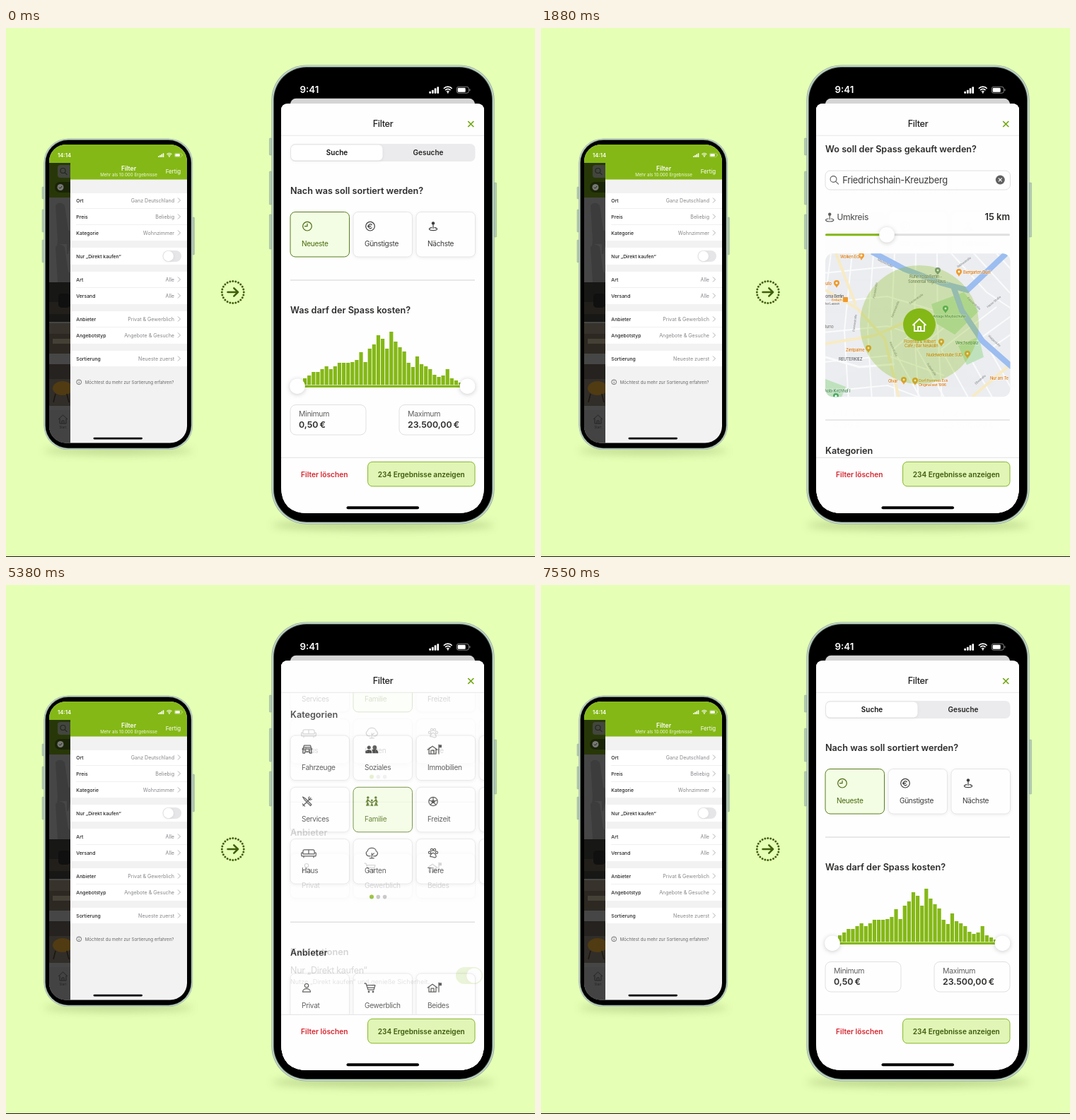
Write an HTML page that moves like this. It is 748 by 749 pixels and loops after 7590 ms.

```html
<!DOCTYPE html>
<html lang="de">
<head>
<meta charset="utf-8">
<title>Filter</title>
<style>
html, body { margin: 0; width: 100%; height: 100%; overflow: hidden; background: #e5ffb5; }
svg { display: block; width: 748px; height: 749px; font-family: Inter, "Open Sans", sans-serif; }
.tight { letter-spacing: -.02em; }
.tight text[font-weight="600"] { letter-spacing: 0; }
.soft { filter: drop-shadow(0 1px 2px rgba(0,0,0,.07)); }
.knob { filter: drop-shadow(0 1px 3px rgba(0,0,0,.2)); }
.ico { fill: none; stroke-width: 1.2; stroke-linecap: round; stroke-linejoin: round; }
</style>
</head>
<body>
<svg id="stage" viewBox="0 0 748 749"></svg>
<script>
const GREEN = '#84b816', INK = '#2c2d2b', GREY = '#5d5e5c';
const rect = (x, y, w, h, fill, r = 0, more = '') =>
  `<rect x="${x}" y="${y}" width="${w}" height="${h}" rx="${r}" fill="${fill}" ${more}/>`;
const disc = (x, y, r, fill, more = '') => `<circle cx="${x}" cy="${y}" r="${r}" fill="${fill}" ${more}/>`;
const line = (d, color, w = 1, more = '') =>
  `<path d="${d}" fill="none" stroke="${color}" stroke-width="${w}" ${more}/>`;
const text = (x, y, size, str, fill = INK, weight = 400, anchor = 'start', more = '') =>
  `<text x="${x}" y="${y}" font-size="${size}" fill="${fill}" font-weight="${weight}" text-anchor="${anchor}" ${more}>${str}</text>`;
const group = (body, attrs) => `<g ${attrs}>${body}</g>`;
const dot = (x, y, r) => `M${x - r} ${y}a${r} ${r} 0 1 0 ${2 * r} 0a${r} ${r} 0 1 0 ${-2 * r} 0`;
const heading = (y, str) => text(402, y, 12.65, str, INK, 600);
const rule = y => line(`M402 ${y}H663`, '#d2d3d2', 1.1);

// Icons are centred on 0,0: [stroked path, filled path]
const house = 'M-8 0L-1-5L6 0M-6-1V6H4V-1M-3 6V1H1V6';
const icons = {
  clock: [dot(0, 0, 6.3) + 'M0-3.5V0H-3.5'],
  euro: [dot(0, 0, 6.3) + 'M2.2-2.2A2.9 2.9 0 1 0 2.2 2.2M-3.6 0H.8'],
  pin: ['M0-2V3M-2 2C-8 3-6 6 0 6S8 3 2 2', dot(0, -4.3, 2.2)],
  car: ['M-6 5V-1L-4.5-6H4.5L6-1V5H3.5V3H-3.5V5ZM-7-1H7M-4.5-3.4H4.5M-4 1H-2M2 1H4'],
  people: ['', dot(-4, -3.3, 2.5) + dot(4, -3.3, 2.9) + 'M-9 5V3C-9-1 0-1 0 3V5ZM1 5V2.5Q.7 1 0 .3C4-2 9 0 9 4V5Z'],
  home: [house + 'M8 6V-7', 'M8-7H12V-3H8Z'],
  tools: ['M-6 6L5-5M3-6.5C0-4 3-1 6.4-3M-6.5-6.5L-3-4.5L6 4.5L4.5 6L-4-2.5ZM-6.7 3.5L-3.5 6.7'],
  family: ['M-6-3V6M-8 1L-6-3L-3 0L0 2L3 0L6-3L8 1M-7.5 6L-6 1L-4 6M0 1V6M-1.5 6L0 3L1.5 6M6-3V6M4 6L6 1L8 6', dot(-5.5, -5.5, 1.8) + dot(0, -1.5, 1.5) + dot(5.5, -5.5, 1.8)],
  ball: [dot(0, 0, 6.2) + 'M0-2.5V-6M2.5-.6L6-2M1.5 2.2L4 5M-1.5 2.2L-4 5M-2.5-.6L-6-2', 'M0-2.8L2.7-.8L1.7 2.5H-1.7L-2.7-.8Z'],
  sofa: ['M-6-1V-3Q-6-5-4-5H8Q10-5 10-3V-1M2-5V1M-6 1Q-6-1-7.5-1T-8 4H12Q13-1 11.5-1T10 1H-6M-5 4V6M9 4V6'],
  tree: ['M0 7V0M0 3L3 0M-3 7H3M-2 4C-9 5-9-2-6-3C-6-9 6-9 6-3C10-1 8 5 2 4'],
  paw: [dot(-5, -1, 1.6) + dot(-2, -4.8, 1.6) + dot(2, -4.8, 1.6) + dot(5, -1, 1.6) + 'M0-.5C3-.5 3 2 4 3.5S3 7 0 5.5S-5 6-4 3.5S-3-.5 0-.5'],
  person: [dot(-1, -3, 2.7) + 'M-6.5 6C-6.5 0 4.5 0 4.5 6Z'],
  cart: ['M-8-6H-6L-3 3H5L7-3.5H-5M-4 0H6', dot(-2, 5.7, 1.4) + dot(4, 5.7, 1.4)]
};
const wide = ['people', 'family', 'tree'];
const icon = (name, x, y, color = INK) => {
  const [stroke, fill = ''] = icons[name];
  return `<g transform="translate(${x} ${y})"><path class="ico" d="${stroke}" stroke="${color}"/><path d="${fill}" fill="${color}"/></g>`;
};
const card = (col, y, name, label, on) => {
  const x = 402 + col * 89, color = on ? '#486a0c' : '#3b3c3a';
  return rect(x, y, 83.5, 63.5, on ? '#f3fde4' : '#fefefe', 7, on ? 'stroke="#587c1d"' : 'stroke="#e4e5e4" class="soft"') +
    (name ? icon(name, x + (wide.includes(name) ? 26.3 : 24), y + 20.2, color) : '') +
    text(x + 16, y + 48.7, 10.1, label, color);
};
const magnifier = (x, y, s, color) =>
  line(dot(x, y, 4.2 * s) + `M${x + 3 * s} ${y + 3 * s}l${4 * s} ${4 * s}`, color, 1.1);

function status(x, y, s) {
  const bars = [3, 5, 7.5, 9.5].map((h, i) => rect(i * 3.7, 10 - h, 2.7, h, '#fff', .7)).join('');
  const wifi = [2.2, 5, 7.8].map(r => line(`M${26.5 - r * .75} ${9.3 - r * .8}A${r} ${r} 0 0 1 ${26.5 + r * .75} ${9.3 - r * .8}`, '#fff', 1.7)).join('');
  return group(bars + wifi + disc(26.5, 8.8, 1.1, '#fff') +
    rect(39, .5, 17, 9, 'none', 2.7, 'stroke="#fff" stroke-opacity=".5"') +
    rect(40.4, 2, 11, 6, '#fff', 1.3) + rect(57, 3.5, 1.2, 3, '#fff', .6, 'opacity=".5"'),
    `transform="translate(${x} ${y}) scale(${s})"`);
}

function phone(x, y, w, h, r, k, left, right) {
  const key = (kx, [ky, kh]) => rect(kx, ky, 3.4 * k, kh, '#b3cbb0', 1, 'stroke="#94ab93" stroke-width=".5"');
  const body = (d, fill, more) => rect(x + d, y + d, w - 2 * d, h - 2 * d, fill, r - d, more);
  return `<ellipse cx="${x + w / 2}" cy="${y + h + 1}" rx="${w * .5}" ry="${7 * k}" fill="#7d9650" opacity=".4" filter="url(#blur)"/>` +
    left.map(b => key(x - 2.6 * k, b)).join('') + right.map(b => key(x + w - .8 * k, b)).join('') +
    body(.4, '#8fa596') + body(1.1 * k, '#c0d4c6') + body(3.1 * k, '#46544b') + body(4 * k, '#000');
}

function oldScreen() {
  const row = (y, label, value) => text(99.3, y + 2.5, 6.85, label, '#222', 500) + (value
    ? text(238, y + 2.5, 7.1, value, '#85868a', 400, 'end') + line(`M243 ${y - 3.5}l3.5 3.5l-3.5 3.5`, '#b0b0b3') : '');
  const section = (y, h) => rect(91, y, 165, h, '#fff');
  const sep = y => line(`M99 ${y}H256`, '#ececec', .8);
  const chair = y => `<path d="M70 ${y}q6-7 13 0l5 35l3 2v18l-3 14h-2v-14h-10l-3 16h-2l2-22z" fill="#3c3c3c"/>`;
  const drawer = rect(61, 191, 30, 397, '#464646') + rect(61, 191, 30, 49, '#283708') +
    rect(73, 194, 24, 18, '#42463d', 4) + magnifier(80.5, 202, .85, '#23261f') +
    rect(69, 218, 30, 15, '#1a2406', 7) + disc(77, 225.5, 4.5, '#777') + line('M75 225.5l1.5 1.6l2.8-3.2', '#1a2406') +
    chair(251) + chair(310) +
    rect(61, 360, 30, 56, '#171716') + rect(61, 388, 30, 17, '#221f1b') + rect(74, 376, 17, 20, '#0f100f', 5) +
    rect(61, 418, 30, 43, '#2d2822') + rect(61, 418, 30, 15, '#37322b') + rect(66, 440, 25, 7, '#454036') +
    rect(61, 476, 30, 59, '#312d29') + rect(61, 476, 30, 21, '#25221f') +
    `<ellipse cx="80" cy="510" rx="14" ry="10" fill="#503b12"/>` + line('M70 518l-3 12M86 518l3 12', '#1c160d', 1.5) +
    rect(61, 541, 30, 47, '#434343') + line('M74 554l6.5-6l6.5 6M76 553v7h9v-7M79 560v-4h3v4', '#252525', 1) +
    text(80.5, 567, 4.5, 'Start', '#252525', 400, 'middle');
  const body = rect(61, 165, 195, 423, '#f2f2f2') + group(drawer, 'clip-path="url(#drawer)"') +
    rect(61, 165, 195, 26, GREEN) + rect(91, 190, 165, 24.5, GREEN) +
    text(73, 182.5, 7.7, '14:14', '#fff', 600) + status(215, 177, .6) +
    text(173.5, 202, 8.6, 'Filter', '#fff', 600, 'middle') +
    text(173.5, 210, 6.2, 'Mehr als 10.000 Ergebnisse', '#f0f8dd', 400, 'middle') +
    text(247, 205.7, 7.9, 'Fertig', '#fff', 400, 'end') +
    section(234, 67) + sep(255.5) + sep(278.5) +
    row(244, 'Ort', 'Ganz Deutschland') + row(267, 'Preis', 'Beliebig') + row(290, 'Kategorie', 'Wohnzimmer') +
    section(311, 24) + row(323, 'Nur „Direkt kaufen“') +
    rect(221.5, 315, 26.5, 16, '#e6e6e8', 8) + disc(229.7, 323, 7.2, '#fff', 'class="soft"') +
    section(345, 46) + sep(367.5) + row(356, 'Art', 'Alle') + row(379, 'Versand', 'Alle') +
    section(401, 46) + sep(423.5) + row(412, 'Anbieter', 'Privat &amp; Gewerblich') + row(435, 'Angebotstyp', 'Angebote &amp; Gesuche') +
    section(457, 22) + row(468, 'Sortierung', 'Neueste zuerst') +
    line(dot(103.2, 501.3, 3.4) + 'M103.2 500.8v2.4M103.2 499v.8', '#555', .8) +
    text(111.8, 503.7, 6.15, 'Möchtest du mehr zur Sortierung erfahren?', '#666') +
    rect(123.5, 579.7, 69.5, 2.8, '#000', 1.4);
  return group(body, 'clip-path="url(#small)"');
}

function sortScreen() {
  const tops = [496, 492, 487, 487, 483, 479, 483, 479, 474, 474, 474, 473, 470, 459, 473, 454, 448, 435, 440,
    454, 430, 444, 452, 458, 474, 480, 465, 476, 479, 483, 491, 494, 492, 483, 496, 499, 502];
  const field = (x, label, value) => rect(x, 533.5, 107, 42.5, '#fefefe', 8, 'stroke="#dfe0df"') +
    text(x + 12, 550, 10.5, label, GREY) + text(x + 12, 566, 12.4, value, INK, 600);
  return rect(402, 164, 261.5, 25, '#ebebed', 7) + rect(403, 165.5, 129.5, 22, '#fff', 6, 'class="soft"') +
    text(468, 180, 10, 'Suche', '#111', 600, 'middle') + text(597, 180, 10, 'Gesuche', '#222', 600, 'middle') +
    heading(235, 'Nach was soll sortiert werden?') +
    card(0, 260.5, 'clock', 'Neueste', true) + card(1, 260.5, 'euro', 'Günstigste') + card(2, 260.5, 'pin', 'Nächste') +
    rule(357) + heading(404, 'Was darf der Spass kosten?') +
    tops.map((y, i) => rect(420 + i * 6.11, y, 5.2, 505.3 - y, GREEN)).join('') + rect(412, 505.8, 241, 3.2, GREEN) +
    [412, 652.5].map(x => disc(x, 507.2, 10.8, '#fff', 'class="knob"')).join('') +
    field(402, 'Minimum', '0,50&#8201;€') + field(556, 'Maximum', '23.500,00&#8201;€');
}

function map() {
  const ORANGE = '#d9780f';
  const label = (x, y, str, color = ORANGE, size = 5.8, more = '') => text(x, y, size, str, color, 500, 'start',
    'stroke="#fff" stroke-width="1" stroke-opacity=".6" paint-order="stroke" ' + more);
  const pin = (x, y, color = '#ee9a2c') => `<path d="M${x} ${y + 6}c-1-3-4-4-4-7a4 4 0 0 1 8 0c0 3-3 4-4 7z" fill="${color}"/>` + disc(x, y - 1, 1.5, '#fff');
  const street = (x, y, angle, str) => text(0, 0, 4.3, str, '#85888c', 400, 'middle', `transform="translate(${x} ${y}) rotate(${angle})"`);
  let roads = '';
  for (let i = 0; i < 6; i++) roads += line(`M${410 + i * 30} 319l${-14 + i * 3} 110l6 100`, '#fafbfb', 2);
  for (let i = 0; i < 5; i++) roads += line(`M400 ${347 + i * 42}l90 -9l80 ${22 + i * 2}`, '#fafbfb', 2);
  for (let i = 0; i < 5; i++) roads += line(`M${540 + i * 34} 530l-42-75l${70 + i * 4}-60`, '#fafbfb', 2);
  for (let i = 0; i < 3; i++) roads += line(`M${580 + i * 32} 319l50 55l60 40`, '#fafbfb', 2);
  return rect(402, 319, 262, 204, '#ebedf0') + roads +
    line('M402 371L447 397L486 440L506 523M402 447L470 436L550 402M417 319L445 392M610 522L664 476', '#f8ebc4', 4) +
    '<path d="M552 391L598 374L619 401L585 434L560 419ZM590 450L619 437L626 466L602 477ZM402 497L431 508L425 523H402Z" fill="#bfe2bd"/>' +
    line('M468 317L513 341L566 361L603 371L660 317M583 366L595 400L624 443L666 480', '#9cbdf0', 8) +
    line('M402 466L450 480L500 476', '#fafbfb', 3) +
    street(445, 418, -83, 'Pannierstraße') + street(474, 372, -80, 'Friedelstraße') + street(497, 455, 66, 'Weserstraße') +
    street(486, 334, 27, 'Maybachufer') + street(611, 391, 43, 'Pannierstraße') + street(641, 389, -39, 'Harzer Straße') +
    street(640, 444, 43, 'Weigandufer') + street(531, 385, -35, 'Sanderstraße') + street(551, 484, 55, 'Fuldastraße') +
    street(502, 399, -68, 'Nansenstraße') + street(622, 499, -40, 'Elbestraße') + street(599, 333, -36, 'Ratiborstraße') +
    pin(453, 323) + label(423, 326, 'Wolken Eck') + pin(591, 346) + label(597, 348, 'Biergarten Quirl') +
    pin(418, 362) + label(402, 364, 'ullo') +
    label(402, 382, 'oma Berlin', '#555', 5.8) + label(411, 387, 'Einfach', ORANGE, 4.7) + label(402, 392, 'ter Lassen', '#777', 4.7) + rect(427, 381, 7, 7, '#ee9a2c', 1) +
    pin(561, 344, '#77918b') + label(521, 354, 'Ruhe Yoga Berlin -', '#666d70') + label(519, 361, 'Sonnental Yoga Haus...', '#666d70') +
    pin(572, 398, '#4ca965') + label(554, 410, 'Anlage Maybachufer', '#398048', 5.3) +
    label(402, 425, 'lumo', '#777', 5.5) + label(586, 448, 'Weichselplatz', '#398048', 5.5) +
    label(513, 446, 'Florentia &amp; Wilbert') + label(514, 452, 'Café / Bar Neukölln') + pin(566, 445) +
    label(431, 458, 'Zimtpalme') + pin(463, 454) + label(545, 465, 'Nudelwerkstube SÜD', ORANGE, 5.5) + pin(603, 462) +
    label(421, 471, 'REUTERKIEZ', '#596066', 6) +
    label(491, 502, 'Olvar') + pin(513, 499) + pin(529, 500) + label(534, 501, 'Dorf Pommes Eck', ORANGE, 5.4) + label(534, 507, 'Original seit 1996', ORANGE, 5.4) +
    label(635, 498, 'Nur am Te') + label(402, 516, 'kobi Kirchhof I', '#398048', 5.8) + pin(417, 522, '#4ca965') +
    disc(535, 420, 84, GREEN, 'opacity=".3"') + disc(535, 420, 23, GREEN) +
    line('M525.5 421L535 412L544.5 421M528 420V429H542V420M533 429V423H537V429', '#fff', 1.9);
}

function placeScreen() {
  return heading(176, 'Wo soll der Spass gekauft werden?') +
    rect(402, 202, 261.5, 27, '#fefefe', 7, 'stroke="#dfe0df"') + magnifier(413.5, 214, 1.05, GREY) +
    text(426.3, 219.7, 12.95, 'Friedrichshain-Kreuzberg', '#3b3c3a') +
    disc(649.3, 215, 6.5, '#606160') + line('M647 212.7l4.6 4.6m0-4.6l-4.6 4.6', '#fff', 1.2) +
    icon('pin', 408.2, 268, GREY) + text(418.5, 272, 11.9, 'Umkreis', GREY, 500) +
    text(663, 272.3, 12.9, '15 km', INK, 600, 'end') +
    rect(402, 291.2, 261, 3, '#e0e0e0', 1.5) + rect(402, 291.2, 87, 3, GREEN, 1.5) + disc(489, 292.8, 10.8, '#fff', 'class="knob"') +
    group(map(), 'clip-path="url(#map)"') + rule(555) + heading(602.5, 'Kategorien');
}

const row = (y, names, labels, on) => names.map((n, i) => card(i, y, n, labels[i], i === on)).join('');
function categoryScreen() {
  return heading(187.7, 'Kategorien') +
    row(213, ['car', 'people', 'home', ''], ['Fahrzeuge', 'Soziales', 'Immobilien', '']) +
    row(286.3, ['tools', 'family', 'ball', ''], ['Services', 'Familie', 'Freizeit', ''], 1) +
    row(359.6, ['sofa', 'tree', 'paw', ''], ['Haus', 'Garten', 'Tiere', '']) +
    disc(517, 441.6, 3, GREEN) + disc(526.3, 441.6, 2.8, '#bdbebc') + disc(535.6, 441.6, 2.8, '#bdbebc') +
    rule(477.3) + heading(524.7, 'Anbieter') +
    row(550, ['person', 'cart', 'home'], ['Privat', 'Gewerblich', 'Beides']);
}
const optionScreen = () => group(categoryScreen(), 'transform="translate(0 -170)"') +
  rule(477) + heading(524, 'Kaufoptionen') +
  text(402, 550, 12.6, 'Nur „Direkt kaufen“', '#3b3c3a') +
  text(402, 565.3, 9.1, 'Nutze „Direkt kaufen“ und genieße Sicherheit.', '#747573', 400, 'start', 'letter-spacing="0"') +
  rect(636, 541, 38, 24, '#9ac943', 12) + disc(662, 553, 10.6, '#fff', 'class="soft"');

const screens = [sortScreen, placeScreen, categoryScreen, optionScreen];
const chrome = rect(389, 107, 287, 45, '#fefefe') + line('M389 152.2H676', '#e6e7e6') +
  text(533, 140.4, 12.7, 'Filter', '#222', 500, 'middle') + line('M653.3 132l8 8m0-8l-8 8', '#6fa60f', 1.7) +
  rect(389, 608, 287, 80, '#fefefe') + line('M389 608.3H676', '#e0e1e0') +
  text(417, 635.6, 10.2, 'Filter löschen', '#d4262f', 600) +
  rect(511.6, 614.3, 151.4, 34.6, '#e0f5b6', 6.5, 'stroke="#86b52a"') +
  text(587.3, 635.6, 10.05, '234 Ergebnisse anzeigen', '#3c5a0a', 600, 'middle') +
  rect(481.5, 677.2, 102.5, 4, '#000', 2);

const stage = document.getElementById('stage');
stage.innerHTML = `<defs><filter id="blur" x="-20%" y="-300%" width="140%" height="700%"><feGaussianBlur stdDeviation="6"/></filter>
  <clipPath id="small">${rect(61, 165, 195, 422.5, '#000', 24)}</clipPath>
  <clipPath id="drawer">${rect(61, 191, 30, 397, '#000')}</clipPath>
  <clipPath id="map">${rect(402, 319.3, 261.5, 203, '#000', 11)}</clipPath>
  <clipPath id="sheet"><path d="M389 117q0-10 10-10H666q10 0 10 10V649q0 38-38 38H427q-38 0-38-38Z"/></clipPath></defs>` +
  rect(0, 0, 748, 749, '#e5ffb5') + rect(0, 748, 748, 1, '#161a10') +
  phone(53, 156, 211.5, 441.5, 35, .75, [[225, 17], [257, 32], [300, 32]], [[268, 53]]) + oldScreen() +
  `<circle cx="320.8" cy="374" r="15.5" fill="none" stroke="#3f5f0b" stroke-width="3" stroke-linecap="round" pathLength="24" stroke-dasharray="0 1"/>` +
  line('M313.5 374H328M322.3 368.3L328 374L322.3 379.7', '#3f5f0b', 2.5, 'stroke-linecap="round" stroke-linejoin="round"') +
  phone(375, 52, 316, 651, 50, 1, [[156, 24], [203, 47], [264, 49]], [[219, 77]]) +
  text(415.5, 92.3, 13.3, '9:41', '#fff', 600) + status(598.3, 82.7, 1) + rect(402, 99.8, 261, 18, '#d4d5d4', 8) +
  group(screens.map(make => group(rect(389, 107, 287, 580, '#fefefe') + make(), 'class="screen"')).join('') + chrome,
    'class="tight" clip-path="url(#sheet)"');

// Each screen dissolves over the one before; the last one fades out to reveal the first.
const layers = stage.querySelectorAll('.screen');
const starts = [1590, 3460, 5345, 7250], LOOP = 7590, FADE = 300;
const easeOut = x => 1 - (1 - Math.min(1, Math.max(0, x))) ** 1.7;
function draw(now) {
  const t = now % LOOP;
  const p = starts.map(s => easeOut((t - s) / FADE));
  const alpha = [1, p[1] < 1 ? p[0] : 0, p[2] < 1 ? p[1] : 0, p[2] * (1 - p[3])];
  layers.forEach((layer, i) => {
    layer.style.opacity = alpha[i];
    layer.style.display = alpha[i] ? '' : 'none';
  });
}
const begin = performance.now();
function tick() {
  draw(performance.now() - begin);
  requestAnimationFrame(tick);
}
tick();
</script>
</body>
</html>
```
